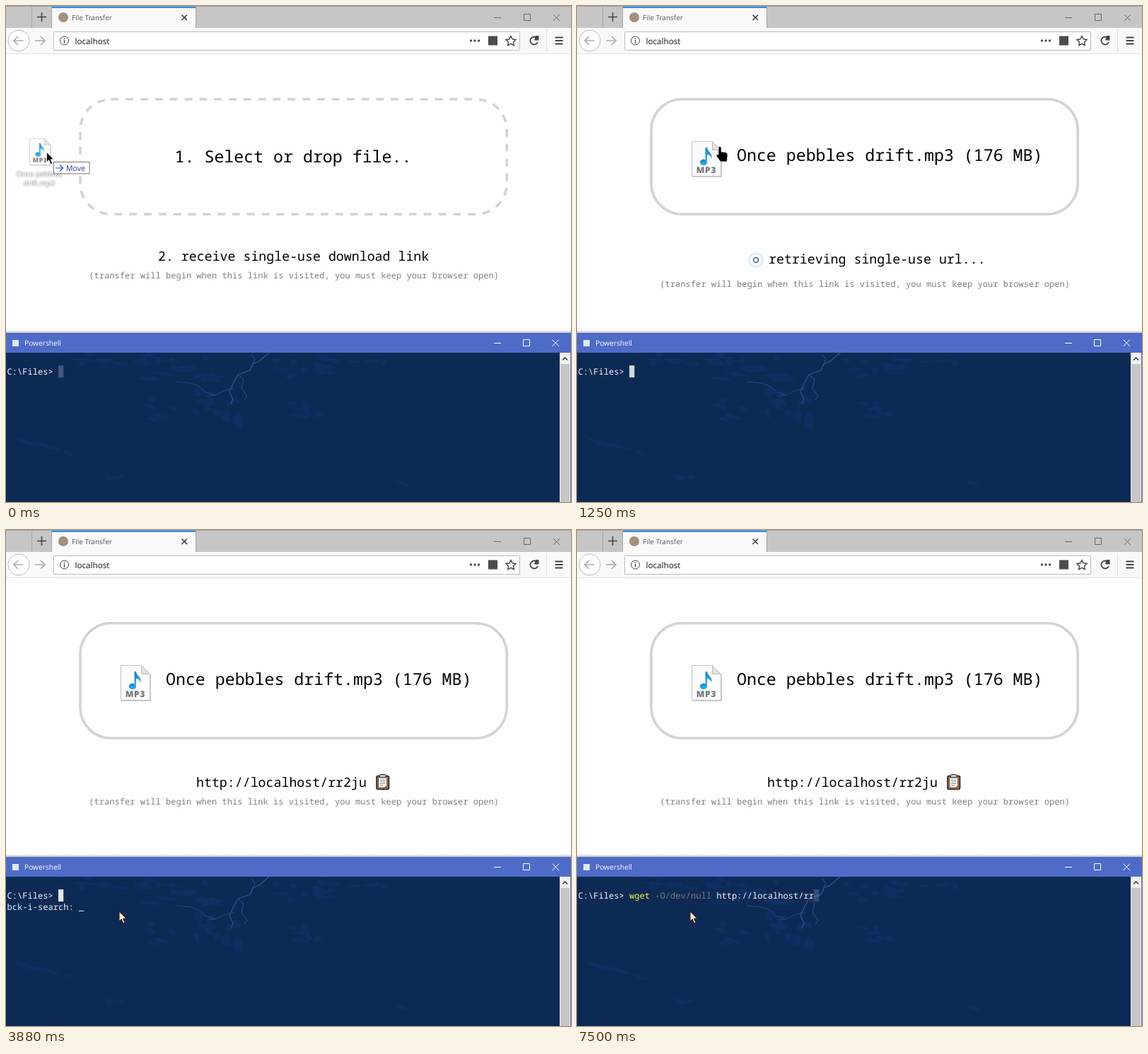
Write an HTML page that moves like this. It is 799 px wide and 701 px high and loops after 8000 ms.

```html
<!DOCTYPE html>
<html lang="en">
<head>
<meta charset="utf-8">
<title>File Transfer</title>
<style>
html, body { margin: 0; width: 100%; height: 100%; overflow: hidden; background: #fefefe; }
svg { display: block; width: 799px; height: 701px; text-rendering: geometricPrecision; }
text { white-space: pre; font-family: "Open Sans", sans-serif; }
.mono text, text.mono { font-family: "Noto Sans Mono", monospace; }
.big { font-size: 23.25px; }
.mid { font-size: 18.25px; }
.small { font-size: 12.08px; }
.mono .small { fill: #808080; }
.line { fill: none; stroke: #444; }
.label { font-size: 10.2px; fill: #fff; text-anchor: middle; filter: drop-shadow(.5px .8px .8px #333); }
</style>
</head>
<body>
<svg viewBox="0 0 799 701">
  <defs>
    <linearGradient id="blue" x1="0" y1="0" x2="0" y2="1">
      <stop offset="0" stop-color="#1583c8"/><stop offset="1" stop-color="#35b0ee"/>
    </linearGradient>
    <linearGradient id="shade" x1="0" y1="0" x2="0" y2="1">
      <stop offset="0" stop-color="#fefefe"/><stop offset="1" stop-color="#c4c4c4"/>
    </linearGradient>
    <g id="file">
      <path d="M1.5 1.5H30.500L43 14V51H1.500Z" fill="#aaa" opacity=".6"/>
      <path d="M.5 .5H29.500L41.500 12.500V49.500H.5Z" fill="#fbfbfb" stroke="#c4c4c4"/>
      <path d="M29.500 .5V12.500H41.500Z" fill="#e3e3e3" stroke="#bbb"/>
      <ellipse cx="17" cy="30" rx="5.200" ry="4.200" fill="url(#blue)"/>
      <path d="M19.500 30V9H22C22 15 30 16 28.500 25C27 20 24 19 22 19V30Z" fill="url(#blue)"/>
      <text x="21" y="45" text-anchor="middle" font-size="12" font-weight="800" fill="#777" letter-spacing=".8">MP3</text>
    </g>
    <path id="arrow" d="M0 0V14L3.200 11L5.500 17L8 16L5.600 10.200H10Z" stroke-width=".9"/>
  </defs>

  <!-- browser chrome -->
  <rect width="799" height="31" fill="#c6c6c6"/>
  <rect width="799" height="1" fill="#a2a2a2"/>
  <path d="M36.500 1V31M64.500 1V31M268.500 1V31" stroke="#a5a5a5"/>
  <rect y="31" width="799" height="37" fill="#f9f9fa"/>
  <rect x="65" y="1" width="203" height="31" fill="#f9f9fa"/>
  <rect x="65" y="1" width="203" height="2" fill="#2b8cf0"/>
  <rect y="67" width="799" height="1" fill="#e3e3e5"/>
  <circle cx="81" cy="16" r="7" fill="#a58f7d"/>
  <text x="93" y="20" font-size="10" fill="#555">File Transfer</text>
  <path class="line" d="M44 15.500H57M50.500 9V22M248.500 12.500L256 20M256 12.500L248.500 20" stroke-width="1.600"/>
  <path class="line" d="M690 16.500H700M732.500 11.500H741.500V20.500H732.500ZM774 12L783 21M783 12L774 21" style="stroke:#666"/>
  <circle cx="18" cy="49" r="15" fill="#fdfdfd" stroke="#bdbdbd"/>
  <path class="line" d="M24.500 49H11.500M17 43L11 49L17 55M41 49H54M49 43L55 49L49 55" stroke-width="1.700" style="stroke:#adadad"/>
  <rect x="67.500" y="36.500" width="659" height="26" rx="1" fill="#fff" stroke="#bcbcbc"/>
  <circle class="line" cx="82.500" cy="49" r="6"/>
  <path class="line" d="M82.500 48V52.500M82.500 45.500V47" stroke-width="1.400"/>
  <text x="97.500" y="53.500" font-size="11.700" fill="#111">localhost</text>
  <g fill="#4a4a4f">
    <circle cx="657.500" cy="49" r="1.700"/><circle cx="663" cy="49" r="1.700"/><circle cx="668.500" cy="49" r="1.700"/>
    <rect x="682" y="42.500" width="13" height="13"/>
    <path d="M749 42L753.500 42V48.500H747Z"/>
  </g>
  <path class="line" d="M714 42.500L716.200 46.800L721 47.500L717.500 50.900L718.300 55.700L714 53.400L709.700 55.700L710.500 50.900L707 47.500L711.800 46.800Z" stroke-width="1.400"/>
  <path class="line" d="M751.500 46A5.500 5.500 0 1 0 752 51" stroke-width="1.800"/>
  <path d="M764.500 33V65" stroke="#dedeea"/>
  <path class="line" d="M776.500 44.500H787.500M776.500 49H787.500M776.500 53.500H787.500" stroke-width="1.800"/>

  <!-- page -->
  <rect id="zone" x="105" y="131.800" width="603.200" height="162.400" rx="43.500" fill="none" stroke-width="3.600"/>
  <g class="mono">
    <text id="prompt1" class="big" x="406" y="221" text-anchor="middle">1. Select or drop file..</text>
    <g id="chosen">
      <use href="#file" x="162" y="191"/>
      <text class="big" x="226" y="219">Once pebbles drift.mp3 (176 MB)</text>
    </g>
    <text id="status" class="mid"></text>
    <text id="hint" class="small" x="117.200">(transfer will begin when this link is visited, you must keep your browser open)</text>
  </g>
  <g id="spinner" fill="none" stroke-width="1.700">
    <circle cx="253" cy="359"/><circle cx="253" cy="359"/>
  </g>
  <g id="clip">
    <rect x="524" y="347.500" width="17.500" height="19" rx="2" fill="#a8683f" stroke="#2b2422" stroke-width="1.600"/>
    <path d="M527 350H538.500V361L535.500 364H527Z" fill="#fff" stroke="#444" stroke-width=".6"/>
    <path d="M529 353.500H536.500M529 356H536.500M529 358.500H536.500M529 361H533.500" stroke="#888"/>
    <rect x="528.500" y="345.500" width="8.500" height="4.500" rx="1.200" fill="#b9c3c9" stroke="#2b2422"/>
  </g>

  <!-- terminal -->
  <rect y="458" width="799" height="4" fill="url(#shade)"/>
  <rect y="462" width="799" height="239" fill="#4f6bc8"/>
  <rect x="9" y="472" width="9" height="9" fill="#dfe8ff"/>
  <text x="26" y="480" font-size="10.200" fill="#fff">Powershell</text>
  <path class="line" d="M690 476.500H700M731.500 471.500H740.500V480.500H731.500ZM772.500 471.500L782 481M782 471.500L772.500 481" style="stroke:#fff"/>
  <svg y="490" width="783" height="211" viewBox="0 490 783 211">
    <rect y="490" width="783" height="211" fill="#0d2a55"/>
    <path id="clouds" fill="#112e62"/>
    <g fill="none" stroke="#3a4f92" stroke-linejoin="round">
      <path d="M372 490L358 502L349 506L345 515L328 521L322 532L316 545L321 556L318 562" stroke-width="1.300"/>
      <path d="M328 521L336 528L333 540L341 552L337 557M349 506L352 499L347 493"/>
      <path d="M322 540L305 545L296 550L283 546L274 538L262 533L240 531M296 550L284 551" opacity=".7"/>
    </g>
  </svg>
  <rect x="783" y="490" width="15" height="211" fill="#f0f0f0"/>
  <rect x="784" y="506" width="13" height="195" fill="#c7c7c7"/>
  <path class="line" d="M787 500.500L790.500 497L794 500.500" stroke-width="1.600"/>
  <rect id="caret" y="508" width="7.250" height="17" fill="#ececf2"/>
  <g class="mono" font-size="12.080" fill="#f4f4f4">
    <text x="1.500" y="521">C:\Files&gt;</text>
    <g id="command">
      <text id="name" x="74" y="521">wget</text>
      <text x="110.250" y="521" fill="#7b7b7b">-O/dev/null</text>
      <text id="url" x="197.250" y="521"></text>
    </g>
    <text id="search" x="1.500" y="537"></text>
  </g>

  <!-- pointers -->
  <g id="ghost">
    <g opacity=".88">
      <use href="#file" transform="translate(-24 -20) scale(.72 .76)"/>
      <text class="label" x="-10" y="34">Once pebbles</text>
      <text class="label" x="-10" y="47">drift.mp3</text>
    </g>
    <rect x="10.500" y="13.500" width="50.500" height="16.500" fill="#fff" stroke="#767676"/>
    <path d="M13 22H23M19 17.500L23.500 22L19 26.500" fill="none" stroke="#2b45c0" stroke-width="1.200"/>
    <text x="28" y="26" font-size="10.600" fill="#2036a8">Move</text>
  </g>
  <path id="hand" d="M-2 1Q0 -2 2 1V7L9 8Q11 9 11 12L10 21H1L-5 13Q-5 10 -2 11Z" fill="#000" stroke="#fff" stroke-width=".6"/>
  <use id="pointer" href="#arrow"/>
</svg>
<script>
const LOOP = 8000, STEP = 125, COL = 7.25;
const $ = id => document.getElementById(id);
const set = (el, attrs) => { for (const k in attrs) el.setAttribute(k, attrs[k]); };
const show = (id, on) => { $(id).style.display = on ? '' : 'none'; };
const place = (id, x, y) => set($(id), { transform: `translate(${x} ${y})` });

// Piecewise linear value from rows of [time, value]
function lerp(rows, t) {
  let i = 1;
  while (i < rows.length - 1 && rows[i][0] < t) i++;
  const [t0, a] = rows[i - 1], [t1, b] = rows[i];
  return a + (b - a) * Math.min(1, Math.max(0, (t - t0) / (t1 - t0)));
}
// Last row value whose time has passed
const held = (rows, t) => rows.reduce((v, [at, next]) => t >= at ? next : v, '');

const CARET = [[-185, 0], [1065, 1], [2315, 0], [3565, 1], [3815, 1], [5065, 0], [6375, 1], [7625, 0]];
const MOUSE_X = [[1375, 202], [1875, 182], [2000, 167], [2125, 160]];
const MOUSE_Y = [[1375, 199], [1500, 240], [1750, 390], [1875, 453], [2000, 503], [2125, 539]];
const TYPED = [[4375, 'w'], [4500, 'wg'], [4625, 'wge'], [4875, 'wget']];
const TAIL = [[7000, 'r'], [7500, 'rr']];
const DROP = 1250, READY = 1750, SEARCH = 3750, ACCEPT = 5750;
const LAG = 21; // the dragged file trails the pointer

const dragX = t => 57 + 145 * Math.min(1, t / 875) ** 1.49;
const dragY = t => 207 - 8 * Math.min(1, t / 500);

function drawClouds() {
  let seed = 23;
  const rnd = () => (seed = seed * 16807 % 2147483647) / 2147483647;
  // x, y, spread x, spread y, slope, patches
  const areas = [
    [130, 502, 50, 9, .1, 9], [245, 512, 55, 20, .1, 14], [300, 560, 32, 28, .1, 10],
    [212, 572, 25, 14, .2, 5], [412, 572, 34, 14, 0, 9], [400, 512, 55, 16, 0, 9],
    [490, 504, 48, 9, 0, 7], [72, 627, 58, 2, .27, 9], [153, 666, 13, 3, 0, 6], [555, 673, 13, 1, .4, 4]
  ];
  let d = '';
  for (const [x, y, w, h, slope, count] of areas)
    for (let i = 0; i < count; i++) {
      const dx = (rnd() * 2 - 1) * w, dy = (rnd() * 2 - 1) * h + dx * slope;
      const rx = 5 + rnd() * w * .3, ry = 2 + rnd() * h * .35;
      for (let k = 0; k < 14; k++) {
        const a = k / 7 * Math.PI, r = .35 + rnd() * .75, px = Math.cos(a) * r * rx;
        d += `${k ? 'L' : 'M'}${x + dx + px} ${y + dy + Math.sin(a) * r * ry + px * slope}`;
      }
      d += 'Z';
    }
  set($('clouds'), { d });
}

function drawPage(t) {
  const dropped = t >= DROP, ready = t >= READY;
  const hover = !dropped && dragX(t) >= 104;
  place('ghost', dragX(t), dragY(t));
  set($('zone'), {
    stroke: hover ? '#6495ed' : '#d3d3d3',
    'stroke-dasharray': dropped ? 'none' : '10.9 9.92'
  });
  set($('prompt1'), { fill: hover ? '#6495ed' : '#000' });
  show('ghost', !dropped);
  show('prompt1', !dropped);
  show('chosen', dropped);
  show('spinner', dropped && !ready);
  show('clip', ready);

  const [text, sx, sy, hy] = !dropped ? ['2. receive single-use download link', 215, 359.5, 384.5]
    : !ready ? ['retrieving single-use url...', 271, 363.5, 396.5]
    : ['http://localhost/rr2ju', 269, 362.5, 387.5];
  $('status').textContent = text;
  set($('status'), { x: sx, y: sy });
  set($('hint'), { y: hy });

  [...$('spinner').children].forEach((ring, i) => {
    const p = (Math.max(0, t - DROP) / 1000 + .22 + i / 2) % 1;
    set(ring, {
      r: 11 * (1 - (1 - p) ** 1.5), opacity: 1 - p,
      stroke: p > .5 ? '#3d9bd0' : '#1c4a80'
    });
  });

  const mx = dropped ? lerp(MOUSE_X, t) : dragX(t + LAG);
  const my = dropped ? lerp(MOUSE_Y, t) : dragY(t + LAG);
  const onPage = my < 490, pointing = dropped && my < 290;
  show('hand', pointing);
  show('pointer', !pointing);
  place('hand', mx, my);
  place('pointer', mx, my);
  set($('pointer'), { fill: onPage ? '#000' : '#ffe3bd', stroke: onPage ? '#fff' : '#111' });
}

function drawTerminal(t) {
  const typed = held(TYPED, t), tail = held(TAIL, t);
  const searching = t >= SEARCH && t < ACCEPT;
  show('command', typed);
  $('url').textContent = 'http://localhost/' + tail;
  set($('name'), { fill: t < ACCEPT ? '#22e6ee' : '#f6f63a' });
  $('search').textContent = searching ? `bck-i-search: ${typed}_` : '';
  const col = t < ACCEPT ? 0 : 34 + tail.length;
  set($('caret'), { x: 74 + col * COL, opacity: lerp(CARET, t) ** .75 });
}

function frame(now) {
  const t = Math.min(7500, Math.floor(now % LOOP / STEP) * STEP);
  drawPage(t);
  drawTerminal(t);
  requestAnimationFrame(frame);
}

drawClouds();
frame(performance.now());
</script>
</body>
</html>
```
